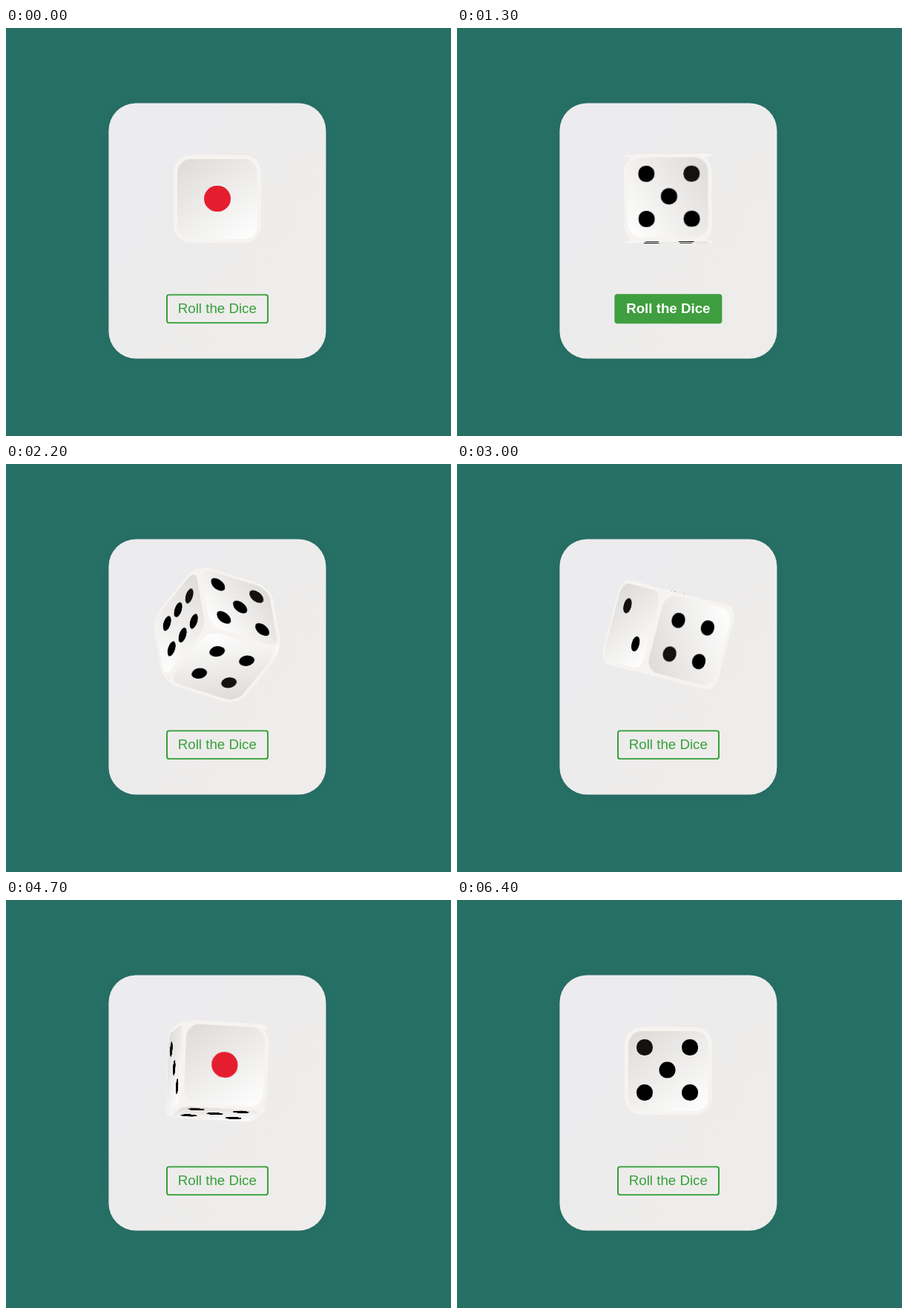
Recreate the animation shown at these times as an HTML page. Size 600 by 551 pixels, loop 6.6 s.

```html
<!DOCTYPE html>
<html lang="en">
<head>
<meta charset="utf-8">
<title>Dice roll</title>
<style>
  html, body { margin: 0; width: 100%; height: 100%; overflow: hidden; background: #277066; }
  .stage { position: relative; width: 600px; height: 551px; overflow: hidden; }
  .card {
    position: absolute; left: 138px; top: 101px; width: 293px; height: 345px;
    transform: translate(.4px, .5px);
    border-radius: 37px; background: linear-gradient(125deg, #ecebed 30%, #eeedeb 70%);
    box-shadow: 0 0 22px rgba(0, 0, 0, .05);
  }
  /* 1em is a tenth of the die's edge */
  .dice {
    position: absolute; left: 226.2px; top: 172px; width: 10em; height: 10em;
    font-size: 11.75px; transform-style: preserve-3d;
  }
  .face {
    position: absolute; width: 100%; height: 100%; box-sizing: border-box;
    border: .5em solid #f6f3f0; border-radius: 2em;
    background: linear-gradient(145deg, #dddbd8, #fff);
    transform-style: preserve-3d;
  }
  .face::before {
    content: ""; position: absolute; width: 100%; height: 100%;
    border-radius: 2em; background: #f6f3f0; transform: translateZ(-.1em);
  }
  .face::after {
    content: ""; position: absolute; left: 50%; top: 50%; width: 1.8em; height: 1.8em;
    border-radius: 50%; background: #131210; color: #000;
  }
  .front { transform: translateZ(5em); }
  .back { transform: rotateX(180deg) translateZ(5em); }
  .top { transform: rotateX(90deg) translateZ(5em); }
  .bottom { transform: rotateX(-90deg) translateZ(5em); }
  .right { transform: rotateY(90deg) translateZ(5em); }
  .left { transform: rotateY(-90deg) translateZ(5em); }
  .front::after { width: 3em; height: 3em; margin: -1.5em; background: #e51e2f; }
  .back::after {
    margin: -3.5em 0 0 -3em;
    box-shadow: 4em 0, 0 2.5em, 4em 2.5em, 0 5em, 4em 5em;
  }
  .top::after { margin: -3em 0 0 -3em; box-shadow: 4em 4em; }
  .bottom::after {
    margin: -3.6em 0 0 -3.6em;
    box-shadow: 2.6em 2.6em, 5.2em 5.2em, 5.2em 0, 0 5.2em;
  }
  .right::after { margin: -3em 0 0 -3em; box-shadow: 4em 0, 0 4em, 4em 4em; }
  .left::after { margin: -3.5em 0 0 -3.5em; box-shadow: 2.5em 2.5em, 5em 5em; }
  .button {
    position: absolute; left: 284.8px; top: 359px; height: 40px; padding: 0 16px;
    box-sizing: border-box; border-radius: 4px; box-shadow: inset 0 0 0 2px #36a03a;
    transform: translate(-50%, .2px); white-space: nowrap; color: #36a03a;
    font: 18.72px/39px "Liberation Sans", Arial, sans-serif;
  }
  .button.hover { background: #3f9e3f; box-shadow: none; color: #fff; font-weight: bold; }
</style>
</head>
<body>
<div class="stage">
  <div class="card"></div>
  <div class="dice">
    <div class="face front"></div>
    <div class="face back"></div>
    <div class="face top"></div>
    <div class="face bottom"></div>
    <div class="face right"></div>
    <div class="face left"></div>
  </div>
  <div class="button">Roll the Dice</div>
</div>
<script>
const LOOP = 6600, STEP = 100;
const HOVER = [500, 1700];
const ROLL = { start: 1016, peak: 3072, end: 5036, turn: [450, 555, 120] };
const SETTLE = { start: 5100, end: 6100, turn: [90, 0, 0] };

const dice = document.querySelector('.dice');
const button = document.querySelector('.button');

// cubic-bezier(.25, .1, .25, 1), solved by bisection
function ease(x) {
  let lo = 0, hi = 1;
  for (let i = 0; i < 24; i++) {
    const u = (lo + hi) / 2;
    if (.75 * u * (1 - u) + u ** 3 < x) lo = u; else hi = u;
  }
  return .3 * lo * (1 - lo) ** 2 + 3 * lo * lo * (1 - lo) + lo ** 3;
}

const progress = (t, from, to) => {
  const x = (t - from) / (to - from);
  return x <= 0 ? 0 : x >= 1 ? 1 : ease(x);
};

function angles(t) {
  if (t >= SETTLE.start) {
    const p = progress(t, SETTLE.start, SETTLE.end);
    return SETTLE.turn.map(a => a * p);
  }
  const p = progress(t, ROLL.start, ROLL.peak) - progress(t, ROLL.peak, ROLL.end);
  return ROLL.turn.map(a => a * p);
}

function draw() {
  const t = Math.floor(performance.now() % LOOP / STEP) * STEP;
  const [x, y, z] = angles(t);
  dice.style.transform = `rotateX(${x}deg) rotateY(${y}deg) rotateZ(${z}deg)`;
  button.classList.toggle('hover', t >= HOVER[0] && t < HOVER[1]);
  requestAnimationFrame(draw);
}
draw();
</script>
</body>
</html>
```
